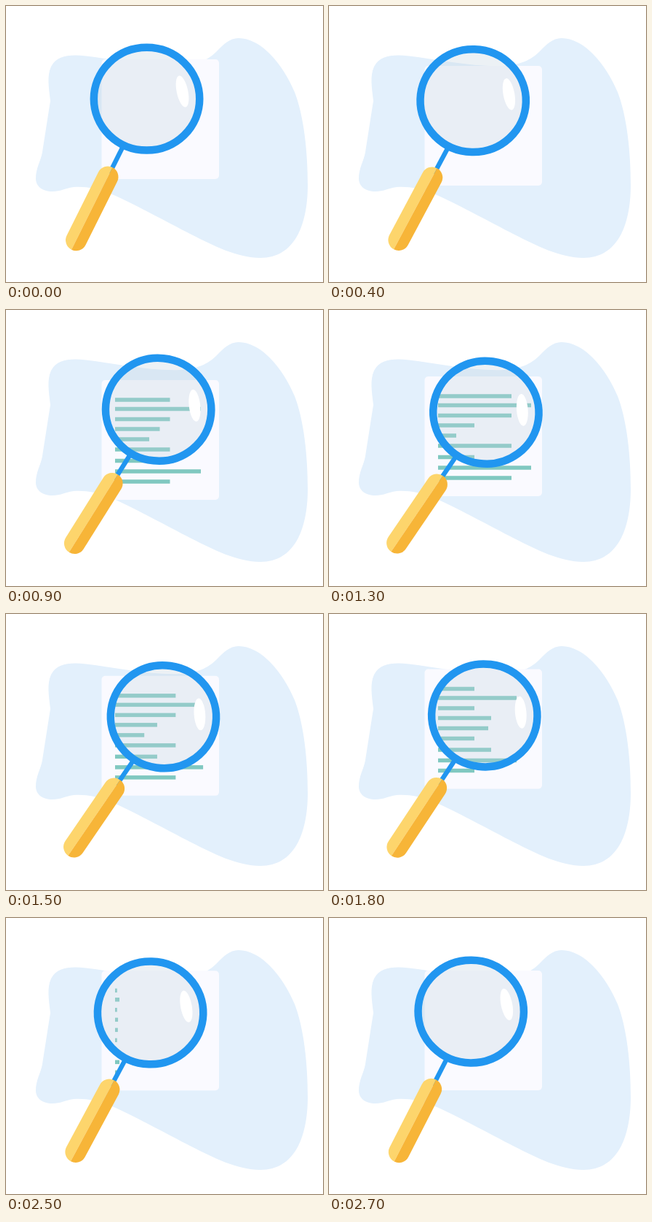
An HTML page with a canvas for the animation above (2.8 s loop, 436 px wide and 378 px high).

```html
<!DOCTYPE html>
<html lang="en">
<head>
<meta charset="utf-8">
<title>Document search</title>
<style>
  html, body { margin: 0; width: 100%; height: 100%; overflow: hidden; background: #fff; }
  canvas { display: block; }
</style>
</head>
<body>
<canvas id="stage" width="436" height="378"></canvas>
<script>
const ctx = document.getElementById('stage').getContext('2d');
const LOOP = 2800, STEP = 100;
const DEG = Math.PI / 180;

const blob = new Path2D(
  'M61 130 C59 112 56 96 62 83 C70 67 90 66 110 68.5 C150 73 200 84 240 82' +
  ' C265 80 277 74 289 63 C299 53 307 44 320 44 C350 44 380 78 397 118' +
  ' C410 152 415 200 415 245 C415 300 397 345 350 345 C318 345 285 328 255 313' +
  ' C220 295 170 268 146 258 C125 249 108 247 93 248 C80 250 75 254 64 254' +
  ' C50 254 41 247 41 236 C41 222 48 212 50 200 C54 175 57 155 61 130 Z');

// [time, vertical offset of the sheet]
const sheetKeys = [[0, 1], [400, 10], [900, 24], [1300, 19], [1800, 3.5], [2200, 1], [2700, 0]];

// Line kinds: [resting width, stretched width]
const A = [50, 101], B = [108, 128], C = [73, 50], D = [69, 25];
const lines = [[27, A], [39.5, B], [53.5, A], [67, C], [81, D], [95, A], [110.5, C], [125, B], [139, A]];

const pivot = { x: 108.2, y: 298.5 };
const lens = { x: 193.5, y: 127.2, rx: 72.7, ry: 70.4 };

function ease(from, to, t) {
  const p = Math.min(1, Math.max(0, (t - from) / (to - from)));
  return (1 - Math.cos(Math.PI * p)) / 2;
}

// Smooth curve through the keys
function curve(keys, t) {
  const last = keys.length - 1;
  const slope = i => {
    const a = keys[Math.max(0, i - 1)], b = keys[Math.min(last, i + 1)];
    return (b[1] - a[1]) / (b[0] - a[0]);
  };
  let i = 0;
  while (i < last - 1 && t > keys[i + 1][0]) i++;
  const [t0, v0] = keys[i], [t1, v1] = keys[i + 1];
  const span = t1 - t0, p = (t - t0) / span, q = 1 - p;
  return v0 * (1 + 2 * p) * q * q + v1 * p * p * (3 - 2 * p)
    + span * p * q * (slope(i) * q - slope(i + 1) * p);
}

function roundRect(x, y, w, h, r, fill) {
  ctx.beginPath();
  ctx.roundRect(x, y, w, h, r);
  ctx.fillStyle = fill;
  ctx.fill();
}

function drawSheet(t) {
  const top = 72 + curve(sheetKeys, t);
  roundRect(131.5, top, 161.5, 164, 5, '#fafaff');

  const grow = ease(430, 700, t) * (1 - ease(2165, 2560, t));
  const stretch = ease(500, 1300, t) * (1 - ease(1300, 1800, t));
  ctx.fillStyle = '#80c8c0';
  for (const [y, [rest, full]] of lines) {
    ctx.fillRect(150, top + y - 2.75, (rest + (full - rest) * stretch) * grow, 5.5);
  }
}

function drawGlass(t) {
  const swing = 4 * (1 - Math.cos(2 * Math.PI * (t + 40) / 3000));
  ctx.save();
  ctx.translate(pivot.x, pivot.y);
  ctx.rotate(swing * DEG);
  ctx.translate(lens.x - pivot.x, lens.y - pivot.y);

  ctx.save();
  ctx.rotate(26.6 * DEG);
  ctx.fillStyle = '#2196f0';
  ctx.fillRect(-3.2, 72, 6.4, 42);
  roundRect(-14.5, 105, 14.5, 126, [14.5, 0, 0, 14.5], '#fdd56c');
  roundRect(0, 105, 14.5, 126, [0, 14.5, 14.5, 0], '#f7b538');
  ctx.restore();

  ctx.beginPath();
  ctx.ellipse(0, 0, lens.rx, lens.ry, 0, 0, 2 * Math.PI);
  ctx.fillStyle = 'rgba(191, 207, 220, 0.3)';
  ctx.fill();
  ctx.lineWidth = 10.5;
  ctx.strokeStyle = '#2196f0';
  ctx.stroke();

  ctx.beginPath();
  ctx.ellipse(49, -10.2, 7.8, 22, -12 * DEG, 0, 2 * Math.PI);
  ctx.fillStyle = '#fff';
  ctx.fill();
  ctx.restore();
}

function frame(now) {
  const t = Math.floor((now % LOOP) / STEP) * STEP;
  ctx.fillStyle = '#fff';
  ctx.fillRect(0, 0, 436, 378);
  ctx.fillStyle = '#e3f0fc';
  ctx.fill(blob);
  drawSheet(t);
  drawGlass(t);
}

let start;
function tick(now) {
  start ??= now;
  frame(now - start);
  requestAnimationFrame(tick);
}
frame(0);
requestAnimationFrame(tick);
</script>
</body>
</html>
```
